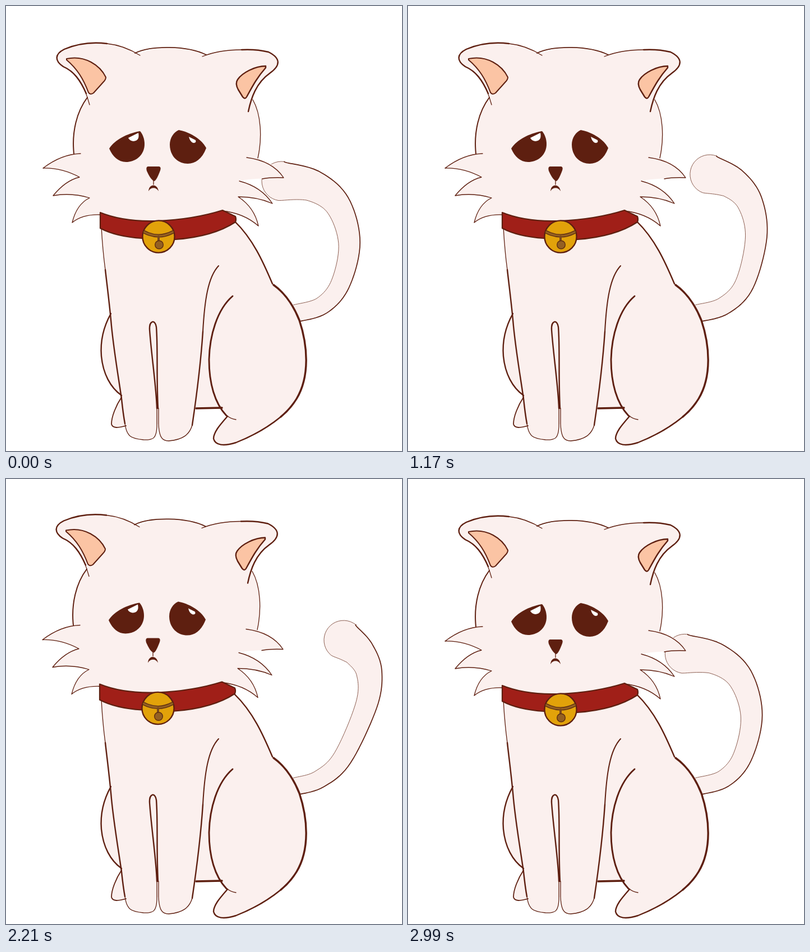
These frames come from a looping animation (706 px wide and 793 px high, 3120 ms). An HTML page:

```html
<!DOCTYPE html>
<html lang="en">
<head>
<meta charset="utf-8">
<title>Sad cat</title>
<style>
  html, body { margin: 0; width: 100%; height: 100%; overflow: hidden; background: #fff; }
  svg { display: block; width: 706px; height: 793px; }
  path, circle { fill: none; stroke-linecap: round; stroke-linejoin: round; }
  .fur { fill: #fbf0ee; }
  .dark { fill: #5e1f10; }
  .peach { fill: #fbc4a4; }
  .red { fill: #a01f18; }
  .gold { fill: #e2a20a; }
  .brown { fill: #946022; }
  .white { fill: #fff; }
  .line { stroke: #5e1f10; stroke-width: 1.3; }
  .mid { stroke-width: 2.4; }
  .bold { stroke-width: 3.4; }
  .soft { stroke: #7f4d3f; stroke-width: .9; }
</style>
</head>
<body>
<svg viewBox="0 0 706 793">
  <g id="tail">
    <path class="fur" id="tailFill"/>
    <path class="soft" id="tailInner"/>
    <path class="line" id="tailOuter" style="stroke-width:1.7"/>
  </g>

  <g id="body">
    <path class="fur" d="M170 390C175 460 180 490 187 548C172 575 168 600 170 624C173 655 186 680 206 695C196 712 188 732 188 745C190 753 200 752 214 748C217 765 223 770 245 773C262 774 268 768 269 745L272 745C273 768 277 775 290 775C318 773 328 763 332 745L337 717H386L395 731C380 748 370 760 370 771C373 783 388 785 410 778C450 762 495 738 518 700C542 660 538 605 523 560C512 533 495 512 476 496C455 445 435 405 405 380Z"/>
    <path class="line" d="M170 394C172 430 175 455 177 470"/>
    <path class="line mid" d="M177 470C181 505 185 535 188 570C193 620 201 664 206 700Q209 728 212 744"/>
    <path class="line" d="M212 744C215 768 224 771 245 773C263 774 268 770 269 750V718"/>
    <path class="line mid" d="M269 717C268 680 259 620 256 577C255 560 266 558 268 572C271 610 268 660 271 717"/>
    <path class="line" d="M272 717V745C273 768 278 775 290 775C315 773 327 764 332 747"/>
    <path class="line mid" d="M332 747C339 700 347 640 351 580"/>
    <path class="line" style="stroke-width:2" d="M351 580C354 525 360 483 379 463"/>
    <path class="line mid" d="M187 548C172 575 168 600 170 624C173 655 186 680 206 694"/>
    <path class="line" style="stroke-width:1.8" d="M206 697C196 712 188 732 188 745C190 753 200 752 214 748"/>
    <path class="line bold" d="M339 717L385 716"/>
    <path class="line mid" d="M408 384C440 415 458 455 475 495"/>
    <path class="line bold" d="M477 497C498 512 513 535 523 560C538 605 542 660 518 700C510 713 501 723 490 732"/>
    <path class="line mid" d="M490 732C468 750 438 767 410 778C388 785 373 783 370 771C370 760 380 748 395 731"/>
    <path class="line" style="stroke-width:2.9" d="M404 517C376 541 363 588 362 630C362 672 372 708 393 730"/>
    <path class="line" d="M394 730Q401 736 410 737"/>
  </g>

  <g id="head">
    <path class="fur" d="M149 172C140 140 125 117 105 109C84 98 86 86 105 77C150 57 210 65 237 86C265 70 320 70 356 87C395 75 440 74 468 82C490 93 490 106 470 120C452 134 444 147 440 167C457 198 457 240 449 272Q478 279 495 306Q458 306 416 311Q455 322 475 352Q448 340 414 340Q443 359 450 392Q424 369 383 365Q275 403 168 372Q135 372 118 386Q126 353 149 342Q116 332 84 338Q106 311 131 305Q99 288 66 289Q97 265 121 263C116 225 125 190 145 163Z"/>

    <path class="line" d="M149 176C140 142 125 117 102 108"/>
    <path class="line mid" d="M143 156C133 133 121 116 102 108C87 98 86 86 104 77C130 66 155 64 180 67"/>
    <path class="line" d="M180 67Q210 70 239 88"/>
    <path class="line" style="stroke-width:1.8" d="M230 84C258 70 323 70 357 87"/>
    <path class="line" d="M350 90C372 81 396 78 420 78"/>
    <path class="line mid" d="M420 78C440 77 456 79 468 82C490 93 490 106 470 120C446 137 437 164 432 188"/>
    <path class="line" style="stroke-width:2" d="M145 163C126 188 117 225 121 263"/>
    <path class="line" d="M440 167C455 193 457 235 449 271"/>

    <path class="peach line" style="stroke-width:2" d="M108 94C141 87 168 106 178 127Q178 131 174 135L156 155Q150 159 147 154C138 130 127 112 108 96Z"/>
    <path class="peach line mid" d="M463 107C444 107 421 119 413 131Q408 138 414 149L422 162Q426 167 429 162C441 140 448 127 463 110Z"/>

    <g class="line">
      <path d="M133 263Q99 264 66 289Q99 288 131 305Q106 311 84 338Q116 332 149 342Q126 353 118 386Q136 371 168 372"/>
      <path d="M429 270Q475 276 495 306Q472 305 457 308"/>
      <path d="M416 312Q455 322 475 352Q448 340 414 340Q443 359 450 392Q424 369 385 365"/>
    </g>

    <path class="dark" d="M184 254C194 238 217 227 239 223C244 229 247 237 247 246C247 265 232 278 214 278C200 278 190 268 184 254Z"/>
    <path class="white" d="M218 235L236 226Q239 240 227 241Q220 240 218 235Z"/>
    <path class="dark" d="M308 221C325 224 347 235 357 253C350 272 338 281 324 281C305 281 292 266 292 247C292 235 299 225 308 221Z"/>
    <path class="white" d="M326 233L338 239Q340 244 334 244Q328 242 326 233Z"/>
    <path class="dark" d="M253 286H273Q277 287 275 293Q268 312 264 312Q258 310 251 294Q249 287 253 286Z"/>
    <path class="line" d="M263 311V318"/>
    <path class="dark" d="M254 330C255 316 270 316 272 330C268 323 259 322 254 330Z"/>

    <path class="red line" style="stroke-width:2.2" d="M168 368C200 381 235 384 270 383C318 381 354 374 386 364L409 375Q411 380 409 385C380 404 342 413 302 416L243 414Q196 411 168 396Z"/>
    <circle class="gold line mid" cx="272" cy="411" r="28.6"/>
    <path d="M247 403Q272 416 297 403" stroke="#5e2d10" stroke-width="6"/>
    <path d="M247 403Q272 416 297 403" stroke="#946022" stroke-width="3.6"/>
    <path d="M272 411V420" stroke="#7c4a1c" stroke-width="4"/>
    <circle class="brown" cx="273" cy="425.5" r="7.3" stroke="#5e2d10" stroke-width="1.4"/>
  </g>
</svg>
<script>
  const STEP = 130, HALF = 6, SAMPLES = 60;
  const $ = id => document.getElementById(id);

  // tail spine from root to tip at three key poses
  const curled = [[517, 547.5], [563, 534], [596, 495], [612, 422], [591, 354], [546, 320], [491, 312]];
  const raised = [[517, 547.5], [562, 535], [603, 496], [628, 402], [624, 345], [605, 311], [577, 290]];
  const open = [[517, 547.5], [557, 535], [599, 497], [648, 402], [656, 345], [638, 308], [611, 286]];
  const LIFTED = .75;  // swing at which the tail is raised

  const mix = (a, b, k) => a.map((p, i) => p.map((v, j) => v + (b[i][j] - v) * k));
  const radius = u => 15.5 + 19.5 * u ** 2.4;

  function spineAt(swing) {
    return swing < LIFTED
      ? mix(curled, raised, (swing / LIFTED) ** 1.5)
      : mix(raised, open, (swing - LIFTED) / (1 - LIFTED));
  }

  // position and direction on a Catmull-Rom spline, u = 0..1
  function along(pts, u) {
    const last = pts.length - 1;
    const i = Math.min(Math.floor(u * last), last - 1), t = u * last - i;
    const [p, q, r, s] = [-1, 0, 1, 2].map(n => pts[Math.max(0, Math.min(last, i + n))]);
    const axis = j => {
      const b = (r[j] - p[j]) / 2;
      const c = p[j] - 2.5 * q[j] + 2 * r[j] - s[j] / 2;
      const d = (s[j] - p[j] + 3 * (q[j] - r[j])) / 2;
      return [q[j] + t * (b + t * (c + t * d)), b + t * (2 * c + 3 * t * d)];
    };
    const [x, dx] = axis(0), [y, dy] = axis(1);
    return { x, y, angle: Math.atan2(dy, dx) };
  }

  function drawTail(spine) {
    const outer = [], inner = [], cap = [];
    const edge = (p, r, turn) => [p.x + r * Math.cos(p.angle + turn), p.y + r * Math.sin(p.angle + turn)];
    for (let i = 0; i <= SAMPLES; i++) {
      const u = i / SAMPLES, p = along(spine, u);
      outer.push(edge(p, radius(u), Math.PI / 2));
      inner.unshift(edge(p, radius(u), -Math.PI / 2));
    }
    const tip = along(spine, 1);
    for (let i = 0; i <= 20; i++) cap.push(edge(tip, radius(1), Math.PI * (.5 - i / 20)));
    const path = pts => 'M' + pts.join('L');
    $('tailFill').setAttribute('d', path([...outer, ...cap, ...inner]) + 'Z');
    $('tailOuter').setAttribute('d', path(outer));
    $('tailInner').setAttribute('d', path([...cap, ...inner]));
  }

  let shown = -1;
  function draw(now) {
    const step = Math.floor(now / STEP) % (2 * HALF);
    if (step === shown) return;
    shown = step;
    const swing = (1 - Math.cos(Math.PI * step / HALF)) / 2;
    const lift = Math.max(0, 7.5 * (swing - .6));
    drawTail(spineAt(swing));
    $('head').setAttribute('transform', `translate(${-Math.min(1, lift)} ${-lift})`);
  }

  const start = performance.now();
  function tick() {
    draw(performance.now() - start);
    requestAnimationFrame(tick);
  }
  tick();
</script>
</body>
</html>
```
